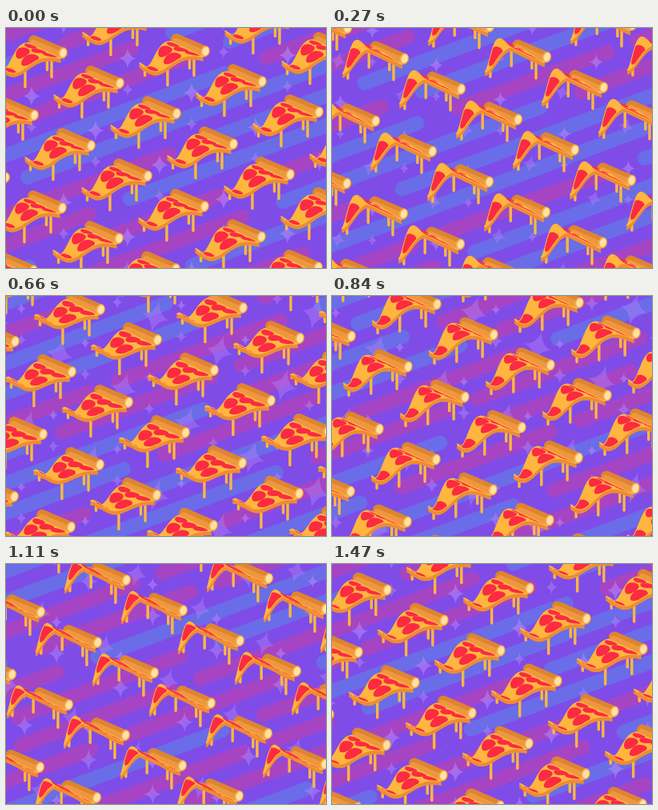
An HTML page with a canvas for the animation above (1.5 s loop, 400 px wide and 300 px high).

```html
<!DOCTYPE html>
<html>
<head>
<meta charset="utf-8">
<title>Pizza pattern</title>
<style>
html, body { margin: 0; width: 100%; height: 100%; overflow: hidden; background: #7f4ce8; }
canvas { display: block; width: 400px; height: 300px; }
</style>
</head>
<body>
<canvas id="stage" width="400" height="300"></canvas>
<script>
const ctx = document.getElementById('stage').getContext('2d');
const LOOP = 1500, STEP = 30, TAU = Math.PI * 2;
const SLOPE = 0.374, ANGLE = -Math.atan(SLOPE);
const lerp = (a, b, k) => a + (b - a) * k;
const clamp = v => Math.max(0, Math.min(1, v));

// Calls draw(x, y) for every lattice point near the stage.
function tile(origin, a, b, draw) {
  for (let j = -5; j <= 8; j++) {
    for (let i = -8; i <= 10; i++) {
      const x = origin[0] + a[0] * i + b[0] * j;
      const y = origin[1] + a[1] * i + b[1] * j;
      if (x > -60 && x < 510 && y > -70 && y < 360) draw(x, y);
    }
  }
}

// ---- Stripes ----
const TRAVEL = 930, LANE_GAP = 37.5;
const laneShifts = [520, 680, 335, 407, 0, 154, 382, 282, 685, 473, 360, 790, 120];
const dashes = [
  [-135, 282, '#6b6ce7'],
  [317, 520, '#a645c4'],
  [541, 760, '#a645c4']
];

function drawStripes(t) {
  ctx.lineCap = 'round';
  ctx.lineWidth = 18;
  laneShifts.forEach((shift, lane) => {
    const c = 9 + lane * LANE_GAP;
    for (const [from, to, color] of dashes) {
      for (let wrap = -2; wrap <= 2; wrap++) {
        const offset = shift + wrap * TRAVEL - TRAVEL * t / LOOP;
        const x1 = from + offset + 8, x2 = to + offset - 8;
        if (x2 < -20 || x1 > 420) continue;
        ctx.strokeStyle = color;
        ctx.beginPath();
        ctx.moveTo(x1, c - SLOPE * x1);
        ctx.lineTo(x2, c - SLOPE * x2);
        ctx.stroke();
      }
    }
  });
}

// ---- Stars ----
const starA = [80, 43], starB = [-40, 90];

function drawStar(x, y, r, turn) {
  ctx.save();
  ctx.translate(x, y);
  ctx.rotate(turn);
  ctx.beginPath();
  ctx.moveTo(0, -r);
  const tips = [[r * 0.85, 0], [0, r], [-r * 0.85, 0], [0, -r]];
  tips.forEach(([px, py], i) => {
    const sx = i === 0 || i === 1 ? 1 : -1, sy = i === 1 || i === 2 ? 1 : -1;
    ctx.quadraticCurveTo(sx * r * 0.14, sy * r * 0.14, px, py);
  });
  ctx.fill();
  ctx.restore();
}

function drawStars(t) {
  const k = t / LOOP;
  const pulse = peak => 7 + 5.5 * Math.pow((1 + Math.cos(TAU * (t - peak) / LOOP)) / 2, 2);
  const layer = (x, y, r, turn, alpha) => {
    ctx.fillStyle = `rgba(178,132,250,${alpha})`;
    tile([x, y], starA, starB, (px, py) => drawStar(px, py, r, turn));
  };
  const swell = Math.sin(Math.PI * k);
  layer(62 - 80 * k, 182 - 43 * k, 21 * swell, 0.26, 0.42);
  layer(112 - 120 * k, 128 + 47 * k, pulse(0), 0, 0.6);
  layer(112 - 120 * k, 167 + 47 * k, pulse(1110), 0, 0.5);
}

// ---- Pizza ----
const pizzaA = [71, 38], pizzaB = [-36, 78];
const CHEESE = '#ffb63f', UNDER = '#ee8c32', CRUST = '#df842f', CRUST_LIGHT = '#ed983f';
const PEPPERONI = '#fb2b42';
const toppings = [
  [0.5, 0.79, 0.115], [0.76, 0.42, 0.13], [0.25, 0.36, 0.125],
  [0.18, 0.1, 0.1], [0.52, 0.14, 0.115], [0.84, 0.1, 0.095]
];
const drips = [[0.14, 25], [0.21, 16], [0.56, 24], [0.92, 11]];

// Vertical ripple running from crust (s = 0) to tip (s = 1), two per loop.
function ripple(s, t) {
  const peak = 390 + 250 * s + 380 * s * s;
  const size = 9.5 + 1.5 * s;
  return lerp(9.5, 6, s) - 8 * Math.sin(Math.PI * s) + size * Math.cos(TAU * (t - peak) / 750);
}

function makeSlice(t) {
  const tipX = -82 + 3 * (1 + Math.cos(TAU * (t - 320) / 750));
  const at = (u, s) => [
    lerp(-43 + 40 * u, tipX, s),
    lerp(-12 + 19 * u, 16, s) + ripple(s, t)
  ];
  const outline = [];
  const N = 20;
  for (let i = 0; i <= N; i++) outline.push(at(0, i / N));
  for (let i = N - 1; i >= 0; i--) outline.push(at(1, i / N));
  const spots = toppings.map(([u, s, r]) => {
    const ring = [];
    const ru = 7 / (44 * (1 - s));
    for (let i = 0; i < 24; i++) {
      const a = TAU * i / 24;
      ring.push(at(clamp(u + ru * Math.cos(a)), clamp(s + r * Math.sin(a))));
    }
    return ring;
  });
  return { outline, spots, bob: ripple(0, t), drips: drips.map(([s, len]) => [...at(1, s), len]) };
}

function trace(points, dy = 0) {
  ctx.beginPath();
  points.forEach(([x, y], i) => i ? ctx.lineTo(x, y + dy) : ctx.moveTo(x, y + dy));
  ctx.closePath();
}

function blob(points, color, dy, width) {
  trace(points, dy);
  ctx.fillStyle = ctx.strokeStyle = color;
  ctx.lineWidth = width;
  ctx.fill();
  ctx.stroke();
}

function line(x1, y1, x2, y2, width, color) {
  ctx.strokeStyle = color;
  ctx.lineWidth = width;
  ctx.beginPath();
  ctx.moveTo(x1, y1);
  ctx.lineTo(x2, y2);
  ctx.stroke();
}

function oval(x, y, rx, ry, color) {
  ctx.fillStyle = color;
  ctx.beginPath();
  ctx.ellipse(x, y, rx, ry, 0.3, 0, TAU);
  ctx.fill();
}

function drawPizza(x, y, slice) {
  ctx.save();
  ctx.translate(x, y);
  ctx.lineCap = ctx.lineJoin = 'round';
  const { bob } = slice;
  for (const [dx, dy, len] of slice.drips) line(dx, dy + 2, dx, dy + len, 3.4, CHEESE);
  line(-36, -15 + bob, -1, bob, 14, CRUST);
  line(-37, -12.5 + bob, -2, 2.5 + bob, 8, CRUST_LIGHT);
  blob(slice.outline, UNDER, 4.5, 2);
  blob(slice.outline, UNDER, 2.5, 2);
  blob(slice.outline, CHEESE, 0, 2);
  for (const spot of slice.spots) {
    trace(spot);
    ctx.fillStyle = PEPPERONI;
    ctx.fill();
  }
  oval(0, bob, 5.4, 7, '#f6ac4b');
  oval(0.4, bob, 3.9, 5.4, '#ffe2a6');
  ctx.restore();
}

function drawPizzas(t) {
  const k = t / LOOP, slice = makeSlice(t);
  tile([142 + 107 * k, 69 - 40 * k], pizzaA, pizzaB, (x, y) => drawPizza(x, y, slice));
}

function frame(now) {
  const t = Math.floor((now % LOOP) / STEP) * STEP;
  ctx.fillStyle = '#7f4ce8';
  ctx.fillRect(0, 0, 400, 300);
  drawStripes(t);
  drawStars(t);
  drawPizzas(t);
  requestAnimationFrame(frame);
}
frame(0);
</script>
</body>
</html>
```
